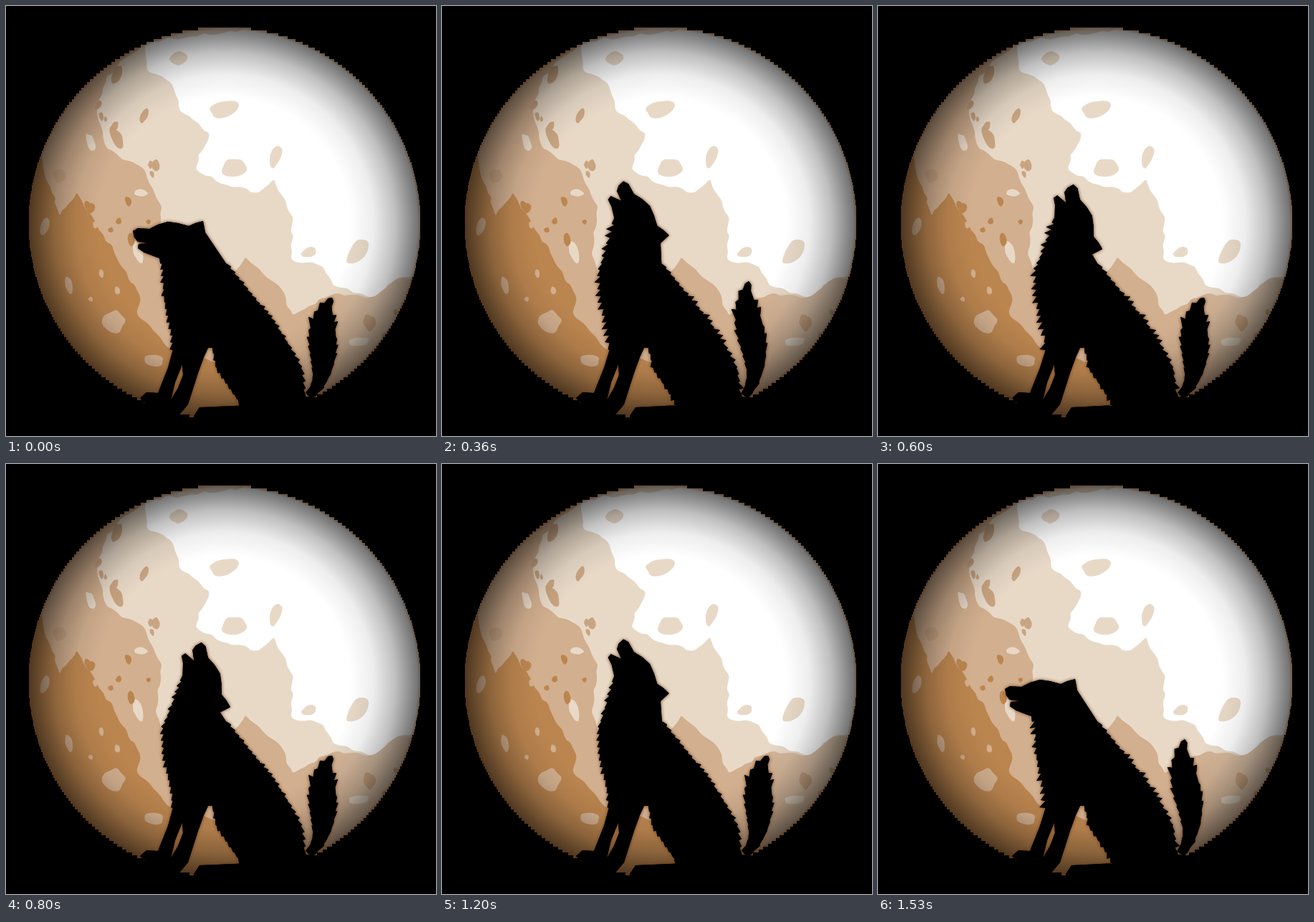
An HTML page with a canvas for the animation above (1.56 s loop, 600x600 px).

```html
<!DOCTYPE html>
<html lang="en">
<head>
<meta charset="utf-8">
<title>Howling wolf</title>
<style>
html, body { margin: 0; width: 100%; height: 100%; overflow: hidden; background: #000; }
canvas { display: block; width: 600px; height: 600px; }
</style>
</head>
<body>
<canvas id="stage" width="600" height="600"></canvas>
<script>
const LOOP = 1560, STEP = 100;
const ctx = document.getElementById('stage').getContext('2d');

function rng(seed) {
  return () => {
    seed = (seed * 1664525 + 1013904223) >>> 0;
    return seed / 4294967296;
  };
}

function polygon(pts, path = new Path2D()) {
  pts.forEach(([x, y], i) => i ? path.lineTo(x, y) : path.moveTo(x, y));
  path.closePath();
  return path;
}

const lerp = (a, b, t) => [a[0] + (b[0] - a[0]) * t, a[1] + (b[1] - a[1]) * t];

function turn([x, y], [cx, cy], degrees) {
  const a = degrees * Math.PI / 180, c = Math.cos(a), s = Math.sin(a);
  return [cx + (x - cx) * c - (y - cy) * s, cy + (x - cx) * s + (y - cy) * c];
}

// Closed curve through the midpoints of a polygon
function smooth(pts) {
  const path = new Path2D();
  path.moveTo(...lerp(pts[pts.length - 1], pts[0], .5));
  pts.forEach((p, i) => path.quadraticCurveTo(...p, ...lerp(p, pts[(i + 1) % pts.length], .5)));
  return path;
}

// Moon

const BEIGE = '#e8d9c7', TAN = '#d2af8f', DUN = '#c9a481', BROWN = '#bb854f';

function disc(r, cell = 4) {
  const path = new Path2D();
  for (let y = 30; y < 576; y += cell) {
    const d = y + cell / 2 - 303;
    const w = Math.round(Math.sqrt(Math.max(0, r * r - d * d)));
    path.rect(305 - w, y, 2 * w, cell);
  }
  return path;
}

// Ragged outline: every side is split up and its points are shaken
function coast(pts, rand, shake = 6) {
  const out = [];
  pts.forEach((p, i) => {
    const q = pts[(i + 1) % pts.length];
    const n = Math.max(2, Math.round(Math.hypot(q[0] - p[0], q[1] - p[1]) / 9));
    for (let k = 0; k < n; k++) {
      out.push(lerp(p, q, k / n).map(v => v + (k ? rand() - .5 : 0) * shake));
    }
  });
  return smooth(out);
}

function spot(x, y, rx, ry, tilt, rand) {
  const pts = [];
  for (let i = 0; i < 10; i++) {
    const a = i * Math.PI / 5, k = .85 + .4 * rand();
    pts.push(turn([x + Math.cos(a) * rx * k, y + Math.sin(a) * ry * k], [x, y], tilt));
  }
  return smooth(pts);
}

function paintMoon() {
  const layer = document.createElement('canvas');
  layer.width = layer.height = 600;
  const g = layer.getContext('2d'), rand = rng(11);
  const fill = (path, color) => { g.fillStyle = color; g.fill(path); };
  const land = (pts, color) => fill(coast(pts, rand), color);
  const dot = (color, ...shape) => fill(spot(...shape, rand), color);
  const scatter = (n, x, y, w, h, size, color) => {
    while (n--) {
      const r = size * (.5 + rand());
      dot(color, x + w * rand(), y + h * rand(), r, r * (1 + rand()), 60 * rand() - 30);
    }
  };

  fill(disc(273.5), BEIGE);
  g.globalCompositeOperation = 'source-atop';

  land([[195, 50], [196, 88], [232, 108], [246, 150], [284, 177], [264, 226], [300, 248], [352, 261],
    [374, 241], [401, 295], [397, 353], [443, 364], [456, 390], [512, 407], [545, 380], [600, 378],
    [600, 0]], '#fff');
  land([[190, 55], [140, 98], [127, 150], [142, 200], [188, 224], [218, 280], [208, 345], [225, 400],
    [330, 420], [330, 600], [0, 600], [0, 60]], TAN);
  const fade = g.createLinearGradient(440, 0, 540, 0);
  fade.addColorStop(0, TAN);
  fade.addColorStop(1, '#dfc8b0');
  land([[300, 400], [334, 350], [384, 394], [400, 432], [455, 402], [512, 406], [545, 381], [620, 380],
    [600, 600], [300, 600]], fade);
  land([[20, 195], [47, 205], [75, 294], [98, 260], [126, 304], [188, 406], [182, 428], [230, 480],
    [340, 510], [340, 600], [0, 600]], BROWN);

  dot(BEIGE, 241, 73, 13, 9, -20);
  dot(BEIGE, 305, 144, 21, 11, -18);
  dot(BEIGE, 319, 226, 17, 13, -20);
  dot(BEIGE, 376, 210, 7, 17, 18);
  dot(BEIGE, 423, 344, 10, 7, -10);
  dot(BEIGE, 490, 344, 12, 20, 35);
  dot(BEIGE, 118, 190, 6, 12, -20);
  dot(BEIGE, 188, 261, 9, 5, 5);
  dot(BEIGE, 184, 343, 6, 16, -15);
  dot(BEIGE, 492, 469, 15, 6, -5);
  dot(TAN, 54, 308, 6, 13, 15);
  dot(TAN, 88, 390, 5, 12, -10);
  dot(TAN, 151, 440, 15, 15, 30);
  dot(TAN, 206, 495, 14, 8, 5);
  dot(DUN, 155, 95, 6, 14, 20);
  dot(DUN, 193, 153, 5, 10, 25);
  dot(DUN, 154, 183, 7, 17, -28);
  dot(DUN, 75, 237, 9, 9, -28);
  scatter(4, 125, 120, 30, 60, 4, DUN);
  scatter(3, 200, 215, 12, 30, 4, DUN);
  scatter(8, 112, 270, 90, 60, 4, BROWN);
  scatter(6, 100, 300, 60, 120, 4, TAN);
  scatter(5, 470, 420, 80, 40, 5, DUN);

  const shade = g.createRadialGradient(305, 303, 0, 305, 303, 274);
  [[.64, 0], [.76, .07], [.87, .25], [.94, .43], [.985, .55]]
    .forEach(([at, a]) => shade.addColorStop(at, `rgba(0,0,0,${a})`));
  shade.addColorStop(1, 'rgba(70,36,10,.8)');
  g.fillStyle = shade;
  g.fillRect(0, 0, 600, 600);
  return layer;
}

// Wolf, outlined from the rump up the back, round the head and down the chest

const BACK = [[418, 545], [413, 505], [394, 470], [371, 435], [344, 403], [308, 358]];
const SKULL = [
  [278, 316], [275, 300], [264, 303], [255, 307], [240, 303], [226, 301], [212, 305], [200, 311],
  [184, 310], [177, 314], [179, 323], [184, 329], [199, 331]
];
const JAW = [[185, 332], [184, 338], [193, 344]];
const THROAT = [214, 352];
const CHEST = [[218, 368], [219, 405], [231, 460], [231, 480]];
const FEET = [
  [226, 505], [212, 540], [196, 539], [187, 547], [205, 566], [238, 575], [254, 556], [268, 512], [276, 490], [282, 477]
];
const BELLY = [[288, 477], [293, 505], [328, 558]];
const RUMP = [[270, 560], [262, 572], [262, 582], [440, 582], [434, 547]];
const LEG_GAP = [[246, 500], [247, 515], [240, 533], [230, 550], [236, 525]];
const NECK = [268, 345], HINGE = [201, 335];

// Adds hair teeth along an open line; lean places each tip within its tooth
function fur(pts, amp, lean, seed, size = 9) {
  const rand = rng(seed), out = [pts[0]];
  for (let i = 1; i < pts.length; i++) {
    const a = pts[i - 1], b = pts[i];
    const len = Math.hypot(b[0] - a[0], b[1] - a[1]), n = Math.max(1, Math.round(len / size));
    const push = (t, h) => {
      const [x, y] = lerp(a, b, t);
      out.push([x - (b[1] - a[1]) * h / len, y + (b[0] - a[0]) * h / len]);
    };
    for (let k = 0; k < n; k++) {
      push((k + lean) / n, amp * (rand() - .1));
      push((k + 1) / n, -amp * .4);
    }
  }
  return out;
}

function wolf([angle, dx, dy, open], amp, seed) {
  const pose = p => {
    const [x, y] = turn(p, NECK, angle);
    return [x + dx, y + dy];
  };
  const path = polygon([
    ...fur(BACK, amp * .8, .15, seed),
    ...SKULL.map(pose),
    ...JAW.map(p => pose(turn(p, HINGE, -open))),
    ...fur([pose(THROAT), ...CHEST], amp, .9, seed + 1),
    ...FEET,
    ...fur(BELLY, amp * .6, .8, seed + 2),
    ...RUMP
  ]);
  return polygon(LEG_GAP, path);
}

// Bushy shape around a cubic curve
function tail(...ctrl) {
  const rand = rng(21), left = [], right = [], n = 26;
  const at = (t, pts = ctrl) => pts.length === 1 ? pts[0]
    : at(t, pts.slice(1).map((p, i) => lerp(pts[i], p, t)));
  for (let i = 0; i < n; i++) {
    const t = i / n, [x, y] = at(t), [u, v] = at(t + .02);
    const len = Math.hypot(u - x, v - y), tuft = i % 2;
    for (const [side, sign] of [[left, 1], [right, -1]]) {
      const hair = tuft * rand() * (2 + 6 * t);
      const w = sign * (6 * (1 - t) + 16 * Math.sin(Math.PI * t ** 1.4) + hair) / len;
      const reach = hair * 1.6 / len;
      side.push([x + (v - y) * w + (u - x) * reach, y - (u - x) * w + (v - y) * reach]);
    }
  }
  return polygon([...left, at(1), ...right.reverse()]);
}

// Head turn in degrees, shift, and jaw opening, from level to full howl
const POSES = [[0, 0, 0, 0], [26, 2, 0, 14], [42, 4, 0, 28], [58, 7, -7, 28], [74, 0, 0, 28]];
const COATS = [[4.5, 3], [7, 40]];
const wolves = COATS.map(coat => POSES.map(pose => wolf(pose, ...coat)));

const ROOT = [422, 544];
const mid = tail(ROOT, [462, 510], [425, 450], [455, 407]);
const left = tail(ROOT, [460, 495], [412, 440], [428, 384]);
const right = tail(ROOT, [465, 510], [450, 455], [474, 412]);
const wag = [mid, right, mid, left];
const moon = paintMoon();

function draw() {
  const step = Math.floor((performance.now() - start) % LOOP / STEP);
  const lift = Math.min(step, 15 - step, POSES.length - 1);
  const parts = [wag[step % 4], wolves[step % 4 >> 1][lift]];

  ctx.globalCompositeOperation = 'copy';
  ctx.drawImage(moon, 0, 0);
  ctx.globalCompositeOperation = 'source-atop';
  ctx.fillStyle = '#000';
  ctx.shadowColor = '#6b3a10';
  for (const blur of [5, 0]) {
    ctx.shadowBlur = blur;
    if (!blur) ctx.shadowColor = 'transparent';
    parts.forEach(p => ctx.fill(p, 'evenodd'));
  }
  requestAnimationFrame(draw);
}

const start = performance.now();
draw();
</script>
</body>
</html>
```
